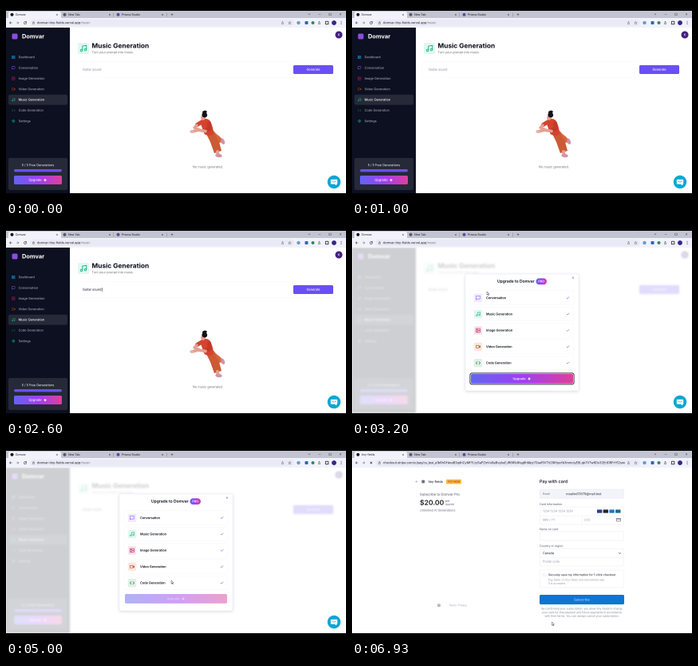
These frames come from a looping animation (426x240 px, 6990 ms). An HTML page with a canvas:

```html
<!DOCTYPE html>
<html lang="en">
<head>
<meta charset="utf-8">
<title>Music Generation</title>
<style>
html, body { margin: 0; width: 100%; height: 100%; overflow: hidden; background: #000; }
canvas { display: block; width: 426px; height: 240px; }
</style>
</head>
<body>
<canvas id="stage"></canvas>
<script>
const W = 426, H = 240, LOOP = 6990;
const TYPE_AT = 1530, KEY_MS = 85, MODAL_AT = 2935, PAY_AT = 4660, CHECKOUT_AT = 6000;
const BRAND = 'Domvar', SHOP = 'tiny-fields', HOST = 'domvar-tiny-fields.vercel.app', PROMPT = 'Guitar sound';
const PRIMARY = '#6a4ff3', INK = '#0b0f1c', GRAY = '#71717a';

// Everything is drawn oversized and scaled down, so tiny text keeps its true shapes.
const dpr = window.devicePixelRatio || 1, SCALE = 4 * dpr;
function size(canvas, scale) {
  canvas.width = W * scale;
  canvas.height = H * scale;
  return canvas.getContext('2d');
}
const screen = size(document.getElementById('stage'), dpr);
const full = size(document.createElement('canvas'), SCALE);
const page = size(document.createElement('canvas'), SCALE);
screen.imageSmoothingQuality = 'high';
full.scale(SCALE, SCALE);
page.scale(SCALE, SCALE);
let g = full;

const ICONS = {
  grid: 'M3 3h7v9H3zM14 3h7v5h-7zM14 12h7v9h-7zM3 16h7v5H3z',
  chat: 'M21 15a2 2 0 0 1-2 2H7l-4 4V5a2 2 0 0 1 2-2h14a2 2 0 0 1 2 2z',
  image: 'M5 3h14a2 2 0 0 1 2 2v14a2 2 0 0 1-2 2H5a2 2 0 0 1-2-2V5a2 2 0 0 1 2-2zM7 9a2 2 0 1 0 4 0a2 2 0 1 0-4 0M21 15l-5-5L5 21',
  video: 'M22 8l-6 4 6 4zM4 6h10a2 2 0 0 1 2 2v8a2 2 0 0 1-2 2H4a2 2 0 0 1-2-2V8a2 2 0 0 1 2-2z',
  music: 'M9 18V5l12-2v13M3 18a3 3 0 1 0 6 0a3 3 0 1 0-6 0M15 16a3 3 0 1 0 6 0a3 3 0 1 0-6 0',
  code: 'M16 18l6-6-6-6M8 6l-6 6 6 6',
  gear: 'M5 12a7 7 0 1 0 14 0a7 7 0 1 0-14 0M10 12a2 2 0 1 0 4 0a2 2 0 1 0-4 0M12 2v3M12 19v3M2 12h3M19 12h3',
  bolt: 'M13 2L3 14h9l-1 8 10-12h-9z',
  check: 'M20 6L9 17l-5-5',
  close: 'M18 6L6 18M6 6l12 12',
  plus: 'M12 4v16M4 12h16',
  minus: 'M4 12h16',
  box: 'M4 4h16v16H4z',
  left: 'M20 12H4M11 5l-7 7 7 7',
  right: 'M4 12h16M13 5l7 7-7 7',
  reload: 'M20 12a8 8 0 1 1-3-6M20 2v6h-6',
  down: 'M5 8l7 8 7-8',
  lock: 'M5 11h14v10H5zM8 11V7a4 4 0 0 1 8 0v4',
  star: 'M12 2l3 7 7 1-5 5 1 7-6-4-6 4 1-7-5-5 7-1z',
  share: 'M4 10v11h16V10M12 15V3M7 7l5-5 5 5',
  card: 'M2 5h20v14H2zM2 10h20'
};
for (const k in ICONS) ICONS[k] = new Path2D(ICONS[k]);

const MODES = {
  Dashboard: ['grid', '#0ea5e9'],
  Conversation: ['chat', '#8b5cf6'],
  'Image Generation': ['image', '#be185d'],
  'Video Generation': ['video', '#c2410c'],
  'Music Generation': ['music', '#10b981'],
  'Code Generation': ['code', '#15803d'],
  Settings: ['gear', '#10b981']
};

function rect(x, y, w, h, fill, r = 0, stroke, lw = 0.35) {
  g.beginPath();
  g.roundRect(x, y, w, h, r);
  if (fill) { g.fillStyle = fill; g.fill(); }
  if (stroke) { g.strokeStyle = stroke; g.lineWidth = lw; g.stroke(); }
}
function blob(x, y, rx, ry, turn, fill) {
  g.beginPath();
  g.ellipse(x, y, rx, ry, turn, 0, 7);
  g.fillStyle = fill;
  g.fill();
}
const disc = (x, y, r, fill) => blob(x, y, r, r, 0, fill);
function shape(fill, pts) {
  g.beginPath();
  pts.forEach(([x, y]) => g.lineTo(x, y));
  g.closePath();
  g.fillStyle = fill;
  g.fill();
}
function limb(color, width, pts) {
  g.beginPath();
  pts.forEach(([x, y]) => g.lineTo(x, y));
  g.strokeStyle = color;
  g.lineWidth = width;
  g.lineCap = g.lineJoin = 'round';
  g.stroke();
}
function text(s, x, y, size, color = INK, weight = 400, align = 'left') {
  g.font = `${weight} ${size}px Inter, "Liberation Sans", sans-serif`;
  g.textAlign = align;
  g.textBaseline = 'middle';
  g.fillStyle = color;
  g.fillText(s, x, y);
}
// Icons sit on a 24-unit grid and are centred on x, y.
function icon(name, x, y, size, color, fill, lw = 2.2) {
  g.save();
  g.translate(x - size / 2, y - size / 2);
  g.scale(size / 24, size / 24);
  g.lineWidth = lw;
  g.lineCap = g.lineJoin = 'round';
  g.strokeStyle = color;
  if (fill) { g.fillStyle = fill; g.fill(ICONS[name]); }
  g.stroke(ICONS[name]);
  g.restore();
}
function premium(x, w) {
  const p = g.createLinearGradient(x, 0, x + w, 0);
  ['#6366f1', '#a03ff5', '#e0409c'].forEach((c, i) => p.addColorStop(i / 2, c));
  return p;
}
function tint(x, y, size, name, color, iconSize) {
  g.save();
  g.globalAlpha *= 0.12;
  rect(x - size / 2, y - size / 2, size, size, color, 1.6);
  g.restore();
  icon(name, x, y, iconSize, color);
}

function drawChrome(t) {
  const paying = t >= CHECKOUT_AT, bar = '#f1f2fb';
  rect(0, 0, W, 6, '#000');
  rect(0, 6, W, 10, '#c2c4d1');
  rect(0, 15, W, 12, bar);
  rect(3, 7, 66, 10, bar, 2);
  const tabs = [[12, paying ? SHOP : BRAND, '#17171f', 64], [78, 'New Tab', '#55596a', 130], [145, 'Prisma Studio', '#5b4aa8', 196]];
  for (const [x, label, color, end] of tabs) {
    disc(x - 4.5, 10.8, 2, color);
    text(label, x, 11, 3.5, '#1d1f27');
    icon('close', end, 10.8, 3, '#222', null, 3);
  }
  rect(134.5, 8.5, 0.4, 5, '#777');
  rect(201, 8.5, 0.4, 5, '#777');
  icon('plus', 208, 10.8, 3.6, '#222', null, 3);
  ['down', 'minus', 'box', 'close'].forEach((n, i) => icon(n, 380 + i * 13, 10.3, 3.6, '#222'));

  icon('left', 6, 21, 4.4, '#333', null, 3);
  icon('right', 14.5, 21, 4.4, '#777', null, 3);
  icon(paying ? 'close' : 'reload', 24, 21, 4.4, '#222', null, 3);
  rect(30, 16.8, 331, 8.4, '#e9eaf5', 4.2);
  icon('lock', 34.5, 21, 3.4, '#444', null, 3);
  g.save();
  g.beginPath();
  g.rect(38, 16, 304, 11);
  g.clip();
  text(paying ? payUrl : HOST, 39, 21.2, 3.9, '#1d1f27');
  if (!paying) text('/music', 39 + g.measureText(HOST).width, 21.2, 3.9, '#777');
  g.restore();
  icon('share', 346.5, 21, 3.8, '#555');
  icon('star', 355.5, 21, 4, '#555');
  disc(366.5, 21, 2.2, '#6a9bc8');
  rect(374.5, 19, 4, 4, '#2f63c0', 1);
  disc(384.5, 21, 2, '#2f8a58');
  icon('share', 392.5, 21, 4, '#333');
  rect(400.3, 19.2, 3.6, 3.6, null, 0.5, '#222', 0.8);
  disc(411, 21, 2.9, '#37248a');
  for (let i = -1; i < 2; i++) disc(420, 21 + i * 1.7, 0.5, '#333');
}

function drawSidebar() {
  const lit = '#252938';
  rect(0, 27, 80, 207, '#0c1020');
  rect(7.5, 34.5, 7, 7, '#8d4be0', 1.5);
  text(BRAND, 20, 38.2, 7.4, '#fff', 700);
  Object.entries(MODES).forEach(([label, [name, color]], i) => {
    const y = 64 + i * 13.3, active = label === 'Music Generation';
    if (active) rect(3, y - 6.4, 74, 12.8, lit, 2);
    icon(name, 9.3, y, 4.8, color);
    text(label, 15.6, y + 0.2, 3.88, active ? '#fff' : '#a1a1aa', 500);
  });
  rect(3, 190, 74, 40, lit, 2);
  text('5 / 5 Free Generations', 40, 199, 3.88, '#fff', 400, 'center');
  rect(10, 204, 60, 3.4, PRIMARY, 1.7);
  rect(10, 212, 60, 11, premium(10, 60), 1.6);
  text('Upgrade', 36.5, 217.7, 3.88, '#fff', 500, 'center');
  icon('bolt', 49, 217.6, 4.2, '#fff', '#fff');
}

function drawFigure() {
  const skin = '#e3a091', red = '#d5432f', rust = '#d9673c', pink = '#d193a6', hair = '#15131a';
  limb(skin, 4, [[263, 166], [269, 169]]);
  blob(271.3, 169, 2.4, 4.2, -0.5, pink);
  limb(rust, 9.5, [[254, 156], [260, 163], [265, 167]]);
  shape('#cb5a35', [[249, 156], [260, 157], [267, 170], [270, 181], [261, 184], [256, 170]]);
  limb(skin, 4, [[265, 182], [265.5, 186]]);
  blob(266.5, 187, 4.2, 2.2, 0.1, pink);
  g.beginPath();
  g.moveTo(243.5, 146);
  g.bezierCurveTo(244, 140, 254, 139, 256.5, 145);
  g.quadraticCurveTo(260, 153, 260, 160);
  g.quadraticCurveTo(255, 164, 248.5, 160);
  g.closePath();
  g.fillStyle = red;
  g.fill();
  limb(red, 5, [[246, 144.5], [239.5, 148.5]]);
  limb(skin, 3.4, [[239, 149], [236, 152], [242, 154.5]]);
  limb('#c23a29', 5.4, [[254.5, 147], [255, 153], [250, 156]]);
  limb(skin, 3.8, [[250, 156.5], [241, 155], [233.5, 157]]);
  blob(232.5, 157, 2.2, 1.9, 0.5, '#eab3a6');
  blob(247, 139.6, 2.9, 3.2, 0.3, skin);
  blob(248.8, 136.2, 3.4, 3.2, 0.5, hair);
  blob(248.9, 132.6, 2.9, 1.9, -0.2, hair);
}

function drawMusic(t) {
  rect(0, 27, W, 207, '#fff');
  drawSidebar();
  disc(417, 36, 4.5, '#43207f');
  text('K', 417, 36.2, 3.8, '#fff', 500, 'center');
  tint(97, 53, 14, 'music', MODES['Music Generation'][1], 10);
  text('Music Generation', 107.5, 50, 8.32, INK, 700);
  text('Turn your prompt into music.', 107.5, 58, 3.88, GRAY);

  rect(88.7, 69.5, 327.4, 20, '#fff', 2, '#f5f6fa');
  const n = Math.max(0, Math.min(PROMPT.length, Math.floor((t - TYPE_AT) / KEY_MS) + 1));
  const typed = PROMPT.slice(0, n);
  text(n ? typed : PROMPT, 96, 79.6, 3.88, n ? INK : '#858a99');
  if (n && t < MODAL_AT) rect(96.5 + g.measureText(typed).width, 77.2, 0.5, 4.8, INK);
  rect(360, 74, 50, 11, PRIMARY, 1.6);
  text('Generate', 385, 79.7, 3.88, '#fff', 500, 'center');

  drawFigure();
  text('No music generated.', 253, 201.3, 3.88, GRAY, 400, 'center');
}

function drawModal(t) {
  const k = Math.min(1, (t - MODAL_AT) / 190), ease = 1 - (1 - k) ** 3;
  g.save();
  g.beginPath();
  g.rect(0, 27, W, 207);
  g.clip();
  g.filter = `blur(${1.1 * SCALE * ease}px)`;
  g.drawImage(page.canvas, 0, 0, W, H);
  g.filter = 'none';
  g.globalAlpha = ease;
  rect(0, 27, W, 207, 'rgba(255,255,255,.8)');

  g.translate(213, 133);
  g.scale(0.95 + 0.05 * ease, 0.95 + 0.05 * ease);
  g.translate(-213, -133);
  g.shadowColor = 'rgba(40,40,80,.16)';
  g.shadowBlur = 4 * SCALE;
  g.shadowOffsetY = SCALE;
  rect(142, 60, 142, 146, '#fff', 2);
  g.shadowColor = 'transparent';
  rect(142, 60, 142, 146, null, 2, '#e4e6ef');

  text(`Upgrade to ${BRAND}`, 182, 69.3, 4.99, INK, 600);
  rect(230.5, 65.4, 13.5, 7.8, premium(230.5, 13.5), 3.9);
  text('PRO', 237.2, 69.5, 3.7, '#fff', 600, 'center');
  icon('close', 277, 64.7, 3.8, '#555');
  ['Conversation', 'Music Generation', 'Image Generation', 'Video Generation', 'Code Generation'].forEach((label, i) => {
    const y = 89.8 + i * 20.35, [name, color] = MODES[label];
    rect(148.5, y - 9, 129, 17.6, null, 2, '#f3f4f8');
    tint(158, y, 10.5, name, color, 6.4);
    text(label, 168, y + 0.2, 3.88, INK, 600);
    icon('check', 270.5, y, 4.8, PRIMARY);
  });

  const waiting = t >= PAY_AT;
  if (!waiting) {
    rect(147.9, 183.9, 130.2, 14, null, 2.4, '#20202c', 0.9);
    rect(148.5, 184.5, 129, 12.8, '#fff', 2);
  }
  if (waiting) g.globalAlpha *= 0.5;
  rect(149, 185, 128, 11.8, premium(149, 128), 1.6);
  text('Upgrade', 209.5, 191.1, 3.88, '#fff', 500, 'center');
  icon('bolt', 222, 191, 4.2, '#fff', '#fff');
  g.restore();
}

function drawHelp() {
  disc(411, 220, 8.2, '#08a7d4');
  rect(406.8, 216.8, 8.4, 5.8, '#fff', 0.8);
  shape('#fff', [[411, 222], [414.5, 222], [414, 224.4]]);
  limb('#08a7d4', 0.6, [[408.5, 219], [411, 220.3], [413.5, 219]]);
}

const payUrl = (() => {
  const set = 'abcdefghijkmnpqrstuvwxyzABCDEFGHJKLMNPRSTUVXYZ0123456789';
  let seed = 41, s = 'checkout.stripe.com/c/pay/cs_test_a1b6';
  for (let i = 0; i < 125; i++) {
    seed = (seed * 16807) % 2147483647;
    s += set[seed % set.length];
  }
  return s;
})();

const LINE = '#e6e7ef';
function field(y, h, fill = '#fff') {
  rect(235.3, y, 105.4, h, fill, 1.4, LINE);
}

function drawCheckout() {
  const soft = '#6b6f80', faint = '#9a9dab';
  rect(0, 27, W, 207, '#fff');

  icon('left', 81, 44.6, 3.6, '#666');
  rect(87.3, 42.6, 3.8, 3.8, '#69717d', 0.8);
  text(SHOP, 95.5, 44.8, 3.8, '#22242c', 500);
  rect(118, 41.7, 19, 5.8, '#ffb84d', 1);
  text('TEST MODE', 127.5, 44.8, 2.7, '#8b4a0b', 700, 'center');
  text(`Subscribe to ${BRAND} Pro`, 85, 60.7, 4.2, soft, 500);
  text('$20.00', 85, 71.2, 8.6, '#1c1d25', 600);
  text('per', 117, 68.7, 3.6, soft, 500);
  text('month', 117, 73.2, 3.6, soft, 500);
  text('Unlimited AI Generations', 85, 80.5, 3.8, soft);
  rect(107, 197.3, 3.8, 3.8, '#b9b9c6', 0.6);
  text('Terms', 121.5, 199.3, 3.2, faint);
  text('Privacy', 132.5, 199.3, 3.2, faint);

  text('Pay with card', 235, 44.7, 5.4, '#20222b', 600);
  field(54, 11.6, '#f3f3fa');
  text('Email', 239, 60, 3.5, soft);
  text('rosalind13579@mail.test', 268, 60, 3.9, '#2a2c36');
  text('Card information', 235, 73, 3.5, soft, 500);
  field(76, 22);
  rect(235.3, 87, 105.4, 0.35, LINE);
  rect(288, 87, 0.35, 11, LINE);
  text('1234 1234 1234 1234', 239, 81.7, 3.8, faint);
  ['#26408b', '#2b2226', '#1d77c4', '#1a6b85'].forEach((c, i) => rect(307 + i * 7.7, 79.5, 6.4, 4.2, c, 0.6));
  text('MM / YY', 239, 92.6, 3.8, faint);
  text('CVC', 291, 92.6, 3.8, faint);
  icon('card', 334, 92.2, 6, '#555');
  text('Name on card', 235, 104.3, 3.5, soft, 500);
  field(107, 11);
  text('Country or region', 235, 125.3, 3.5, soft, 500);
  field(128.5, 21.5);
  rect(235.3, 139.2, 105.4, 0.35, LINE);
  text('Canada', 239, 134.2, 3.9, '#2a2c36');
  icon('down', 335.5, 134, 3.8, '#333', null, 3);
  text('Postal code', 239, 144.6, 3.8, faint);
  field(155, 22);
  rect(239, 159.3, 3.4, 3.4, '#fff', 0.7, '#d8dbe6');
  text('Securely save my information for 1-click checkout', 246, 161.2, 3.55, '#33353f', 500);
  text(`Pay faster on ${SHOP} and everywhere else`, 246, 167.5, 3.3, faint);
  text('it is accepted.', 246, 172, 3.3, faint);
  rect(235, 186, 106, 12, '#0f74d4', 1.6);
  text('Subscribe', 288, 192.2, 4.1, '#b5d8fa', 500, 'center');
  [
    `By confirming your subscription, you allow ${SHOP} to charge`,
    'your card for this payment and future payments in accordance',
    'with their terms. You can always cancel your subscription.'
  ].forEach((s, i) => text(s, 288, 203.6 + i * 4.6, 3.4, '#858895', 400, 'center'));
}

const PATH = [[3000, 169, 82], [3200, 169, 82], [4130, 285, 69], [4560, 214, 190], [4700, 214, 190], [5000, 207, 168], [6100, 222, 188], [6930, 250.5, 220]];
const POINTER = [[0, 0], [0, 4.2], [1, 3.3], [1.7, 4.8], [2.3, 4.5], [1.7, 3.1], [3, 3]];
function drawCursor(t) {
  if (t < PATH[0][0]) return;
  let i = 0;
  while (i < PATH.length - 2 && t >= PATH[i + 1][0]) i++;
  const [t0, x0, y0] = PATH[i], [t1, x1, y1] = PATH[i + 1];
  const k = Math.min(1, (t - t0) / (t1 - t0)), e = k * k * (3 - 2 * k);
  g.save();
  g.translate(x0 + (x1 - x0) * e, y0 + (y1 - y0) * e);
  shape('#fff', POINTER);
  g.strokeStyle = '#333';
  g.lineWidth = 0.4;
  g.stroke();
  g.restore();
}

function draw(t) {
  const paying = t >= CHECKOUT_AT, modal = t >= MODAL_AT && !paying;
  g = modal ? page : full;
  if (paying) drawCheckout();
  else drawMusic(t);
  g = full;
  if (modal) drawModal(t);
  if (!paying) drawHelp();
  drawChrome(t);
  rect(0, 234, W, 6, '#000');
  drawCursor(t);
  screen.drawImage(full.canvas, 0, 0, W * dpr, H * dpr);
}

const start = performance.now();
function tick() {
  draw((performance.now() - start) % LOOP);
  requestAnimationFrame(tick);
}
tick();
</script>
</body>
</html>
```
